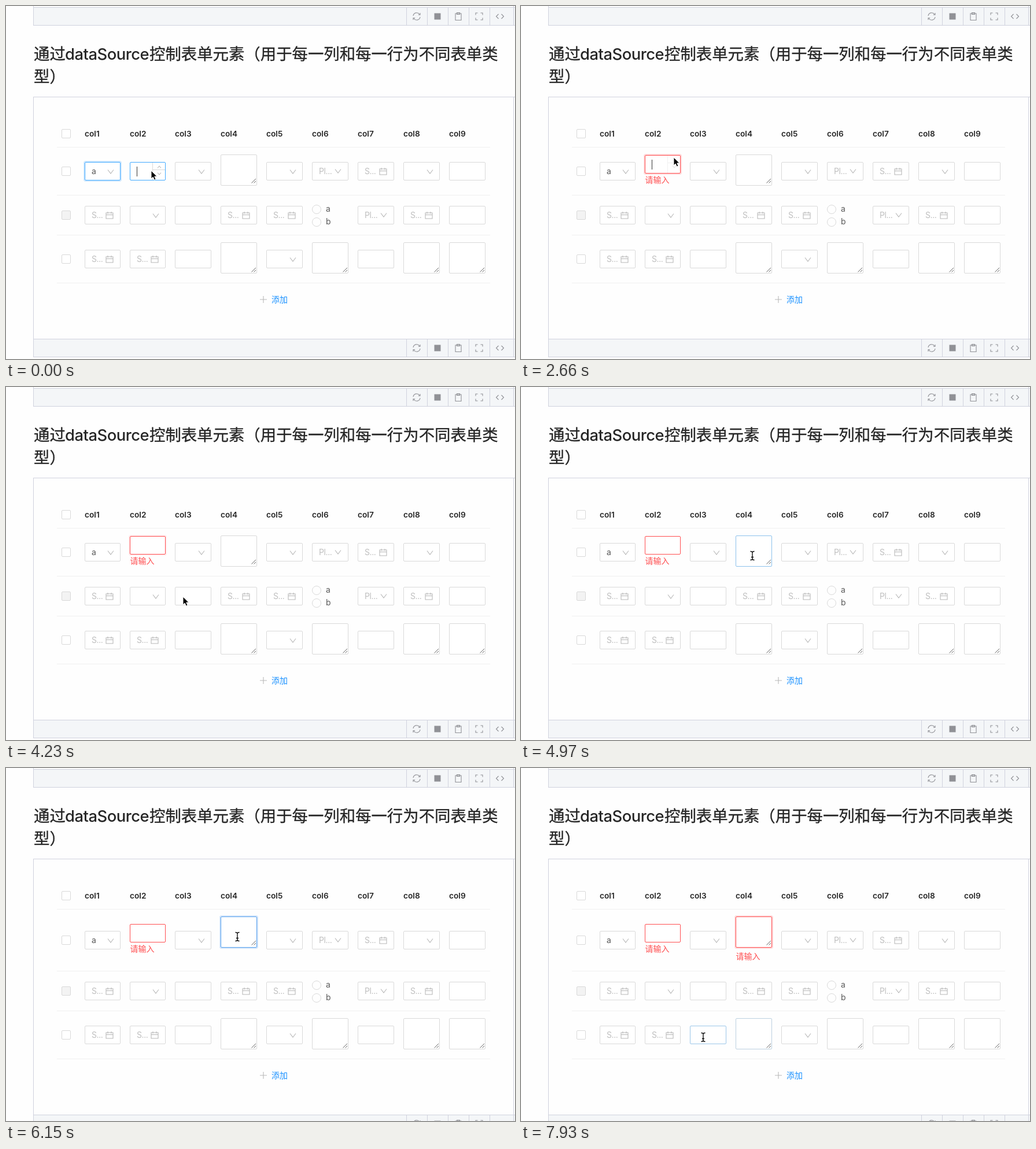
Animation of 880x611 px, one loop 8000 ms. Source, as an HTML page:

```html
<!DOCTYPE html>
<html lang="zh">
<head>
<meta charset="utf-8">
<title>Form table</title>
<style>
html, body { margin: 0; width: 100%; height: 100%; overflow: hidden; background: #fefefe; }
svg { display: block; width: 880px; height: 611px; }
text { font: 14px Inter, "Noto Sans CJK SC", "Noto Sans CJK", sans-serif; fill: #595959; }
path, rect, circle { fill: none; }
.title { font-size: 27.4px; font-weight: 500; fill: #262626; stroke: #262626; stroke-width: .35px; }
.latin { letter-spacing: -.5px; stroke: none; }
.head { font-weight: 600; font-size: 13.7px; fill: #262626; }
.hint { fill: #bfbfbf; letter-spacing: -.4px; }
.link { fill: #1890ff; }
.error { fill: #ff4d4f; }
.box, .radio, .handles { stroke: #d9d9d9; }
.box { fill: #fff; }
.off { fill: #f3f3f3; }
.rule { stroke: #f0f0f0; }
.frame { stroke: #d0d2de; }
.bar { fill: #f4f6f8; }
.tool { stroke: #909196; stroke-width: 1.1; }
.mark { fill: #909196; }
.icon { stroke: #b8b8b8; stroke-width: 1.1; }
.grip { stroke: #666; }
.glow { stroke-width: 2; stroke: transparent; }
.caret { stroke: #333; }
.arrow { fill: #000; stroke: #fff; }
.hand { fill: #fff; stroke: #000; stroke-width: 1.1; }
.beam { stroke: #000; stroke-width: 1.3; }
</style>
</head>
<body>
<svg id="stage" viewBox="0 0 880 611"></svg>
<script>
const LOOP = 8000;
const colX = [136, 214, 292, 371, 450, 529, 608, 687, 766];
const rowY = [286, 362, 438];
const width = c => c < 2 ? 62 : 63;

const path = (cls, d, x = 0, y = 0) => `<path class="${cls}" d="${d}" transform="translate(${x} ${y})"/>`;
const text = (cls, x, y, s, id = '') => `<text class="${cls}" id="${id}" x="${x}" y="${y}">${s}</text>`;
const rect = (cls, x, y, w, h, id = '', r = 1.5) =>
  `<rect class="${cls}" id="${id}" x="${x}" y="${y}" width="${w}" height="${h}" rx="${r}"/>`;
const group = (id, ...parts) => `<g id="${id}">${parts.join('')}</g>`;

// Form controls; each is centred vertically on its row
function frame(r, c, h = 32) {
  const x = colX[c], y = rowY[r] - h / 2, w = width(c);
  return rect('glow', x - 1, y - 1, w + 2, h + 2, `glow${r}${c}`, 3) +
    rect('box', x + .5, y + .5, w - 1, h - 1, `box${r}${c}`);
}
const chevron = (x, y) => path('icon', 'M-5 -3.5L0 3L5 -3.5', x, y);
const controls = {
  input: frame,
  select: (r, c) => frame(r, c) + chevron(colX[c] + width(c) - 17, rowY[r] + 1),
  chosen: (r, c) => controls.select(r, c) + text('', colX[c] + 12, rowY[r] + 5, 'a'),
  tree: (r, c) => frame(r, c) + text('hint', colX[c] + 12, rowY[r] + 5, 'Pl...') +
    chevron(colX[c] + width(c) - 18, rowY[r]),
  date: (r, c) => frame(r, c) + text('hint', colX[c] + 12, rowY[r] + 5, 'S...') +
    path('icon', 'M-6 -4.5H6V5.5H-6ZM-6 -1H6M-3 -6.5V-3M3 -6.5V-3', colX[c] + width(c) - 19, rowY[r] + .5),
  area: (r, c) => frame(r, c, 54) +
    path('grip', 'M-9.5 -2.5L-2 -10M-5.5 -2.5L-2 -6', colX[c] + width(c), rowY[r] + 25 + (r ? 0 : -2) + 2),
  radio: (r, c) => [['a', -10], ['b', 12]].map(([s, dy]) =>
    `<circle class="radio" cx="${colX[c] + 8}" cy="${rowY[r] + dy}" r="7.5"/>` +
    text('', colX[c] + 24, rowY[r] + dy + 4, s)).join(''),
  number: (r, c) => group('number', frame(r, c),
    group('handles', path('handles', 'M39.5 1V31M39.5 13.5H61', colX[c], rowY[r] - 16),
      path('icon', 'M-3 2L0 -1.5L3 2', colX[c] + 51, rowY[r] - 7.5),
      path('icon', 'M-3 -1.5L0 2L3 -1.5', colX[c] + 51, rowY[r] + 4)),
    path('caret', 'M12.5 8V25', colX[c], rowY[r] - 16).replace('<path', '<path id="caretNumber"'),
    text('error', colX[c] + .5, rowY[r] + 32, '请输入', 'errorNumber')),
};
const row = (r, list) => list.split(' ').map((k, c) => k === '-' ? '' : controls[k](r, c)).join('');
const check = (y, cls = '') => rect('box ' + cls, 96.5, y - 7.5, 15, 15);

const tools = [
  'M-6 -1A6 6 0 0 1 5 -3.5M6 -6V-2.8H2.8M6 1A6 6 0 0 1 -5 3.5M-6 6V2.8H-2.8',
  '',
  'M-5 -5H5V6.5H-5ZM-2.5 -6.5H2.5V-3.5H-2.5Z',
  'M-6 -2.5V-6H-2.5M2.5 -6H6V-2.5M6 2.5V6H2.5M-2.5 6H-6V2.5',
  'M-2.5 -4L-6.5 0L-2.5 4M2.5 -4L6.5 0L2.5 4',
];
const toolbar = y => rect('bar', 47, y, 833, 32, '', 0) +
  path('frame', 'M47 .5H880M47 31.5H880M692.5 0V31M728.5 0V31M764.5 0V31M800.5 0V31M836.5 0V31', 0, y) +
  tools.map((d, i) => d ? path('tool', d, 710 + 36 * i, y + 16)
    : rect('mark', 704.5 + 36 * i, y + 10.5, 11, 11, '', 0)).join('');
const sides = (a, b) => path('frame', `M47.5 ${a}V${b}M877.5 ${a}V${b}`);

document.getElementById('stage').innerHTML = [
  toolbar(2), sides(0, 33),
  text('title', 48, 93, '通过'), text('title latin', 102, 93, 'dataSource'),
  text('title', 248, 93, '控制表单元素（用于每一列和每一行为不同表单类'), text('title', 48, 132, '型）'),
  path('frame', 'M47 157.5H880'), sides(157, 590),
  check(221), colX.map((x, i) => text('head', x, 226, 'col' + (i + 1))).join(''),
  path('rule', 'M88 244.5H837'),
  group('first', check(286), row(0, 'chosen number select - select tree date select input')),
  `<g transform="translate(0 -2)">${controls.area(0, 3)}</g>`,
  path('caret', 'M383.5 265V281').replace('<path', '<path id="caretArea"'),
  text('error', 371.5, 331, '请输入', 'errorArea'),
  group('below',
    path('rule', 'M88 327.5H837M88 396.5H837M88 479.5H837'),
    check(362, 'off'), row(1, 'date select input date date radio tree date input'),
    check(438), `<g transform="translate(0 -2)">${row(2, '- - - area - area - area area')}</g>`,
    row(2, 'date date input - select - input - -'),
    path('icon', 'M-6 0H6M0 -6V6', 445, 508), text('link', 459, 513, '添加'),
    toolbar(576), sides(500, 607)),
  group('cursor',
    group('arrow', path('arrow', 'M0 0V14L3.2 11L5.4 16L8 15L5.8 10H10.2Z')),
    group('hand', path('hand', 'M-1.5 1C-1.5 -.8 1.5 -.8 1.5 1V6C2.5 5 4 5.5 4.3 6.5C5.3 5.6 6.8 6 7 7.2' +
      'C8 6.6 9.6 7.2 9.6 8.8V11.5C9.6 13.5 8 14.5 8 16.5H0C0 14.5 -4 11 -5 9C-5.5 7.5 -3.5 7 -2.6 8.2L-1.5 9.6Z')),
    group('beam', path('beam', 'M-3.5 -7.5Q0 -7.5 0 -5.5Q0 -7.5 3.5 -7.5M0 -6V6M-3.5 7.5Q0 7.5 0 5.5Q0 7.5 3.5 7.5M-2 2.5H2'))),
].join('');

// Keyframes written in milliseconds
let css = '';
function animate(id, prop, keys, easing = 'linear') {
  const last = keys[keys.length - 1][1];
  const body = [...keys, [LOOP, last]].map(([t, v]) => `${t / LOOP * 100}%{${prop}:${v}}`).join('');
  css += `@keyframes ${id}-k{${body}}#${id}{animation:${id}-k ${LOOP}ms ${easing} infinite}`;
}
const jump = (id, prop, keys) => animate(id, prop, keys, 'step-end');
const move = (x, y) => `translate(${x}px,${y}px)`;

const grey = '#d9d9d9', blue = '#40a9ff', red = '#ff4d4f';
const blueGlow = 'rgba(24,144,255,.2)', redGlow = 'rgba(255,77,79,.2)';
const noBlue = 'rgba(24,144,255,0)', noRed = 'rgba(255,77,79,0)';

animate('box00', 'stroke', [[0, blue], [140, blue], [440, grey]]);
animate('glow00', 'stroke', [[0, blueGlow], [140, blueGlow], [440, noBlue]]);

jump('number', 'transform', [[0, move(0, 0)], [1480, move(0, -12)]]);
animate('box01', 'stroke', [[0, blue], [1480, blue], [1920, red]]);
animate('glow01', 'stroke', [[0, noBlue], [140, noBlue], [440, blueGlow], [1480, blueGlow],
  [1920, redGlow], [4080, redGlow], [4380, noRed]]);
animate('handles', 'opacity', [[0, 1], [2520, 1], [2750, 0]]);
jump('caretNumber', 'opacity', [[0, 1], [4080, 0]]);
animate('errorNumber', 'opacity', [[0, 0], [1790, 0], [2070, 1]]);

animate('box02', 'stroke', [[0, grey], [2970, grey], [3200, blue], [3630, blue], [3930, grey]]);

animate('box03', 'stroke', [[0, grey], [4820, grey], [5120, blue], [6120, blue], [6420, red]]);
animate('glow03', 'stroke', [[0, noBlue], [5270, noBlue], [5570, blueGlow], [6120, blueGlow], [6420, redGlow]]);
jump('caretArea', 'opacity', [[0, 0], [5400, 1], [5850, 0], [7330, 1], [7780, 0]]);
animate('errorArea', 'opacity', [[0, 0], [6300, 0], [6600, 1]]);

jump('first', 'transform', [[0, move(0, 0)], [6000, move(0, 12)]]);
jump('below', 'transform', [[0, move(0, 0)], [6000, move(0, 24)]]);

animate('box23', 'stroke', [[0, grey], [7190, grey], [7420, blue], [7720, blue], [7980, grey]]);
animate('box22', 'stroke', [[0, grey], [7780, grey], [8000 - 1, '#7fbdf0']]);

const stops = [
  [0, 251, 285], [2520, 264, 262], [2670, 286, 232], [2820, 306, 242], [2970, 318, 290],
  [3120, 322, 321], [3310, 319, 299], [3630, 315, 316], [3780, 309, 344], [3930, 306, 363],
  [4380, 326, 352], [4520, 354, 322], [4670, 370, 298], [4820, 400, 292],
  [6600, 399, 325], [6750, 398, 355], [6900, 397, 385], [7040, 396, 405],
  [7190, 398, 444], [7330, 400, 458], [7480, 388, 464], [7640, 374, 467], [7780, 315, 466],
];
jump('cursor', 'transform', stops.map(([t, x, y]) => [t, move(x, y)]));
jump('arrow', 'opacity', [[0, 1], [2970, 0], [3630, 1], [4820, 0], [6600, 1], [7190, 0]]);
jump('hand', 'opacity', [[0, 0], [2970, 1], [3630, 0]]);
jump('beam', 'opacity', [[0, 0], [4820, 1], [6600, 0], [7190, 1]]);

document.head.appendChild(document.createElement('style')).textContent = css;
</script>
</body>
</html>
```
